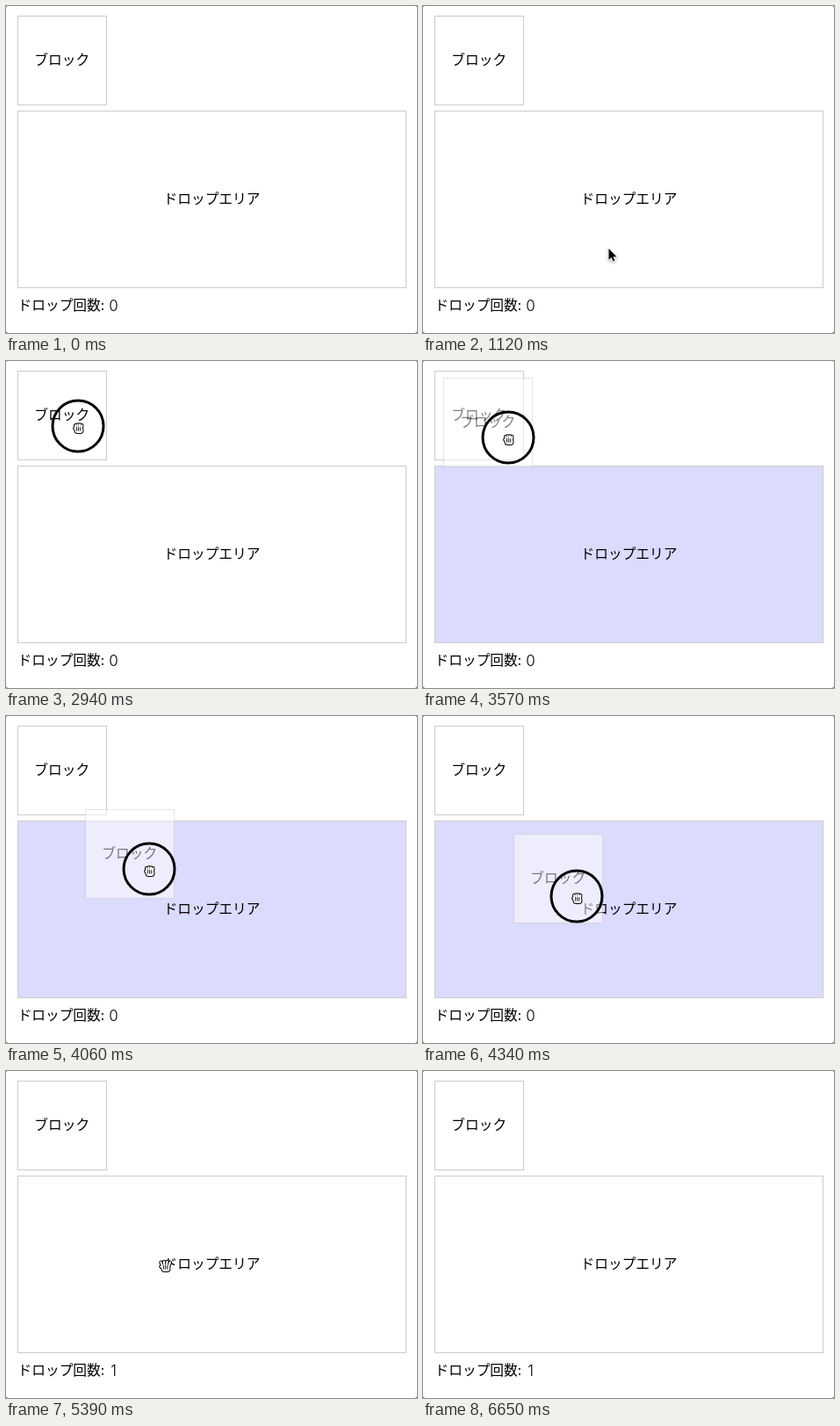
An HTML page with a canvas for the animation above (7.35 s loop, 468 by 372 pixels).

```html
<!DOCTYPE html>
<html lang="ja">
<head>
<meta charset="utf-8">
<title>ドラッグ＆ドロップ</title>
<style>
html, body { margin: 0; width: 100%; height: 100%; overflow: hidden; background: #fff; }
canvas { display: block; }
</style>
</head>
<body>
<canvas id="stage" width="468" height="372"></canvas>
<script>
const ctx = document.getElementById('stage').getContext('2d');
const LOOP = 7350, STEP = 70;
const KANA = '15.7px "Noto Sans CJK JP", "Noto Sans CJK", sans-serif';
const DIGIT = '300 17px Inter, "DejaVu Sans", sans-serif';

const smooth = k => k * k * (3 - 2 * k);
const easeOut = k => k * (2 - k);
const easeIn = k => k ** 1.5;
const linear = k => k;

// Pointer tip: each leg starts where the last one ended
const ENTRY = { x: 231, y: 334 };
const GRAB = { x: 80, y: 67 };
const DROP = { x: 179, y: 213 };
const legs = [
  { from: 980, to: 1120, end: { x: 211, y: 275 }, ease: easeOut },
  { from: 1260, to: 1470, end: { x: 117, y: 100 }, ease: smooth },
  { from: 1680, to: 1890, end: { x: 69, y: 53 }, ease: smooth },
  { from: 1890, to: 2100, end: { x: 90, y: 73 }, ease: smooth },
  { from: 2170, to: 2380, end: GRAB, ease: smooth },
  { from: 3290, to: 3570, end: { x: 95, y: 80 }, ease: easeIn },
  { from: 3570, to: 4060, end: { x: 161, y: 167 }, ease: smooth },
  { from: 4060, to: 4480, end: DROP, ease: linear },
  { from: 6510, to: 6580, end: { x: 223, y: 325 }, ease: linear }
];

function pointerAt(t) {
  let { x, y } = ENTRY;
  for (const { from, to, end, ease } of legs) {
    if (t < from) break;
    const k = ease(Math.min(1, (t - from) / (to - from)));
    x += (end.x - x) * k;
    y += (end.y - y) * k;
  }
  return { x: Math.round(x), y: Math.round(y) };
}

function text(str, x, y, font = KANA, align = 'center') {
  ctx.font = font;
  ctx.textAlign = align;
  ctx.fillStyle = '#000';
  ctx.fillText(str, x, y);
}

function box(x, y, w, h, fill) {
  ctx.fillStyle = fill;
  ctx.fillRect(x + 1, y + 1, w - 2, h - 2);
  ctx.strokeStyle = '#ccc';
  ctx.lineWidth = 1;
  ctx.strokeRect(x + 0.5, y + 0.5, w - 1, h - 1);
}

function block() {
  box(13, 11, 102, 102, '#fff');
  text('ブロック', 63.7, 67);
}

function ghost(p) {
  ctx.save();
  ctx.globalAlpha = 0.5;
  ctx.translate(p.x - GRAB.x, p.y - GRAB.y);
  block();
  ctx.restore();
}

function drawArrow(p) {
  const arrow = new Path2D('M0 0V14.6L3.4 11.4L5.6 16.6L7.9 15.6L5.7 10.6H10.2Z');
  ctx.save();
  ctx.translate(p.x + 0.5, p.y + 1);
  ctx.scale(0.88, 0.88);
  ctx.lineJoin = 'round';
  ctx.shadowColor = 'rgba(0,0,0,.35)';
  ctx.shadowBlur = 3;
  ctx.shadowOffsetY = 1;
  ctx.strokeStyle = '#fff';
  ctx.lineWidth = 2;
  ctx.stroke(arrow);
  ctx.shadowColor = 'transparent';
  ctx.fillStyle = '#000';
  ctx.fill(arrow);
  ctx.restore();
}

function line(x1, y1, x2, y2, width, color) {
  ctx.beginPath();
  ctx.moveTo(x1, y1);
  ctx.lineTo(x2, y2);
  ctx.lineWidth = width;
  ctx.strokeStyle = color;
  ctx.stroke();
}

// Thick black limbs under thinner white ones leave a joined outline
function drawHand(p, closed) {
  const reach = closed ? 4.5 : 6.2, spread = closed ? 0.08 : 0.24;
  ctx.save();
  ctx.translate(p.x + 2.7, p.y + 8.7);
  ctx.lineCap = 'round';
  for (const [color, edge] of [['#000', 2], ['#fff', 0]]) {
    line(-1.2, 3.3, 1.8, 3.3, 6 + edge, color);
    line(-2, 3.5, -2 - reach * 0.55, 0.8, 2.2 + edge, color);
    for (let i = -1.5; i <= 1.5; i++) {
      const a = i * spread, x = i * 2.1;
      line(x, 1.5, x + Math.sin(a) * reach, 1 - Math.cos(a) * reach + Math.abs(i) * 0.5, 2.2 + edge, color);
    }
  }
  for (let i = -1; i <= 1; i++) line(i * 2.1, 0, i * 2.1, 3.5, 0.9, '#000');
  ctx.restore();
}

function drawRing(p) {
  ctx.beginPath();
  ctx.arc(p.x + 2, p.y + 7, 29, 0, Math.PI * 2);
  ctx.strokeStyle = '#000';
  ctx.lineWidth = 3;
  ctx.stroke();
}

function draw(t) {
  const within = (from, to) => t >= from && t < to;
  const p = pointerAt(t);
  const dragging = within(3430, 5390);
  const pressed = within(2940, 5040);

  ctx.fillStyle = '#777';
  ctx.fillRect(0, 0, 468, 372);
  ctx.fillStyle = '#fff';
  ctx.beginPath();
  ctx.roundRect(0, 0, 468, 372, [2, 2, 3, 3]);
  ctx.fill();

  block();
  box(13, 119, 443, 202, dragging ? '#dbdbfe' : '#fff');
  text('ドロップエリア', 234.5, 225);
  text('ドロップ回数:', 13.6, 346, KANA, 'left');
  text(t < 5390 ? '0' : '1', 122.5, 347, DIGIT);

  if (dragging) ghost(pointerAt(t - STEP));
  if (pressed) drawRing(p);
  if (within(2450, 5670)) drawHand(p, pressed);
  else if (within(980, 6650)) drawArrow(p);
}

const start = performance.now();
function tick() {
  const t = (performance.now() - start) % LOOP;
  draw(Math.floor(t / STEP) * STEP);
  requestAnimationFrame(tick);
}
tick();
</script>
</body>
</html>
```
